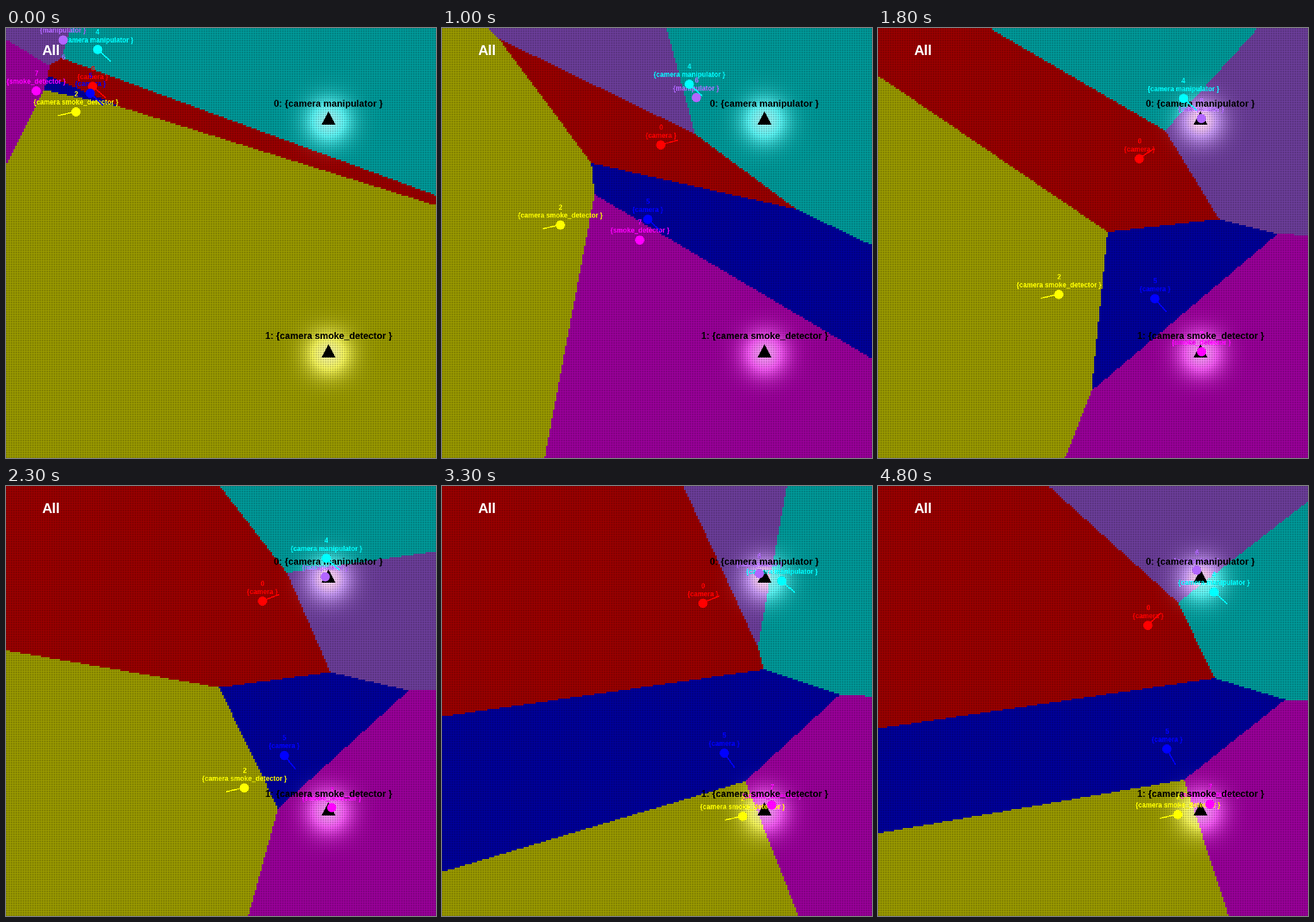
Write a matplotlib script that moves like this. It is 748 px wide and 748 px high and loops after 4900 ms.

```python
import matplotlib.pyplot as plt
import numpy as np
from matplotlib.animation import FuncAnimation
from matplotlib.patches import Circle, Polygon

SIZE, DPI = 748, 100
FRAMES, STEP_MS = 49, 100
PITCH, CELLS = 3, 249
RAY, LOCK = 31, 205

TARGETS = [(561, 157, "0: {camera manipulator }"), (561, 562, "1: {camera smoke_detector }")]


class Agent:
    """A robot that runs at constant speed between a few (step, x, y) stops."""

    def __init__(self, number, text, rgb, stops, heading=None, target=None):
        self.number, self.text, self.rgb = number, text, rgb
        self.heading, self.target = heading, target
        self.stops = np.array(stops).T

    def at(self, step):
        t, x, y = self.stops
        return np.interp(step, t, x), np.interp(step, t, y)

    def aim(self, x, y):
        """Fixed heading, unless a watched target is close enough to lock on."""
        if self.target is not None:
            dx, dy = TARGETS[self.target][0] - x, TARGETS[self.target][1] - y
            if np.hypot(dx, dy) < LOCK:
                return np.arctan2(dy, dx)
        return np.radians(self.heading)


# in drawing order
AGENTS = [
    Agent(7, "{smoke_detector }", (255, 0, 255),
          [(-1, 23, 83), (17.5, 562, 563), (27, 569, 556), (39, 577, 553)]),
    Agent(0, "{camera }", (255, 0, 0),
          [(-1, 121, 95), (0, 150, 101), (6, 296, 199), (13, 443, 206), (18, 454, 227),
           (27, 439, 178), (39, 468, 229), (48, 469, 242)], heading=41, target=0),
    Agent(2, "{camera smoke_detector }", (255, 255, 0),
          [(-1, 111, 127), (6, 182, 256), (13, 223, 407), (18, 314, 463),
           (27, 494, 574), (29, 523, 575), (48, 521, 571)], heading=167),
    Agent(4, "{camera manipulator }", (0, 255, 255),
          [(-1, 143, 35), (0, 159, 37), (5, 430, 107), (6, 445, 114), (12, 422, 89), (13, 450, 86),
           (18, 531, 122), (26, 572, 127), (27, 596, 139), (39, 585, 190), (48, 584, 184)], heading=42),
    Agent(5, "{camera }", (0, 0, 255),
          [(-1, 115, 109), (0, 146, 113), (6, 269, 231), (13, 424, 408), (16, 480, 471),
           (27, 486, 467), (48, 502, 457)], heading=43, target=1),
    Agent(6, "{manipulator }", (178, 102, 255),
          [(-1, 67, 11), (6, 290, 76), (13, 556, 154), (18, 562, 157), (27, 549, 158), (39, 554, 146)]),
]

axis = np.arange(CELLS) * PITCH + 2
GX, GY = np.meshgrid(axis, axis)
BASE = np.array([a.rgb for a in AGENTS]) * 0.63
GLOW = 160 * sum(np.exp(-((GX - x) ** 2 + (GY - y - 4) ** 2) / (2 * 27 ** 2))
                 for x, y, _ in TARGETS)[..., None]

# one black pixel at each crossing of the lattice
gap = np.arange(CELLS * PITCH) % PITCH == 2
MASK = ~(gap[:, None] & gap)[..., None]


def field(step):
    """Voronoi cells of where the agents stood one step earlier."""
    sites = [a.at(step - 1) for a in AGENTS]
    owner = np.argmin([(GX - x) ** 2 + (GY - y) ** 2 for x, y in sites], axis=0)
    cells = np.clip(BASE[owner] + GLOW, 0, 255).astype(np.uint8)
    img = np.zeros((SIZE, SIZE, 3), np.uint8)
    img[1:, 1:] = cells.repeat(PITCH, 0).repeat(PITCH, 1) * MASK
    img[0], img[:, 0] = img[3], img[:, 3]
    return img


fig = plt.figure(figsize=(SIZE / DPI, SIZE / DPI), dpi=DPI, facecolor="black")
ax = fig.add_axes([0, 0, 1, 1])
ax.axis("off")
image = ax.imshow(field(0), extent=(0, SIZE, SIZE, 0), interpolation="nearest", aspect="auto")
ax.set(xlim=(0, SIZE), ylim=(SIZE, 0))


def label(x, y, text, px, color, z, ha="center"):
    return ax.text(x, y, text, color=color, fontsize=px * 72 / DPI, ha=ha, va="baseline",
                   family="Liberation Sans", weight="bold", zorder=z)


# layers: triangles, agent labels, target labels, agents
label(62.5, 46.5, "All", 24.5, "white", 3, "left")
for x, y, text in TARGETS:
    ax.add_patch(Polygon([(x, y - 12), (x - 12, y + 11), (x + 12, y + 11)], fc="black", lw=0, zorder=3))
    label(x, y - 20.5, text, 16.1, "black", 5)

marks = []
for agent in AGENTS:
    color = tuple(c / 255 for c in agent.rgb)
    ray, = ax.plot([], [], color=color, lw=0.6, solid_capstyle="butt", antialiased=False, zorder=6)
    disc = ax.add_patch(Circle((0, 0), 8, fc=color, lw=0, zorder=7))
    name = label(0, 0, agent.text, 11.8, color, 4)
    number = label(0, 0, agent.number, 11.8, color, 4)
    marks.append((agent, ray, disc, name, number))


def update(i):
    image.set_data(field(i))
    for agent, ray, disc, name, number in marks:
        x, y = agent.at(i)
        disc.center = (x + 0.5, y + 0.5)
        name.set_position((x + 0.5, y - 12))
        # the number drops below the disc near the top edge
        number.set_position((x + 0.5, y - 26 if y > 30 else y + 35))
        if agent.heading is not None:
            a = agent.aim(x, y)
            ray.set_data([x, x + RAY * np.cos(a)], [y, y + RAY * np.sin(a)])
    return []


anim = FuncAnimation(fig, update, frames=FRAMES, interval=STEP_MS, repeat=True, repeat_delay=0, blit=False)
plt.show()
```
